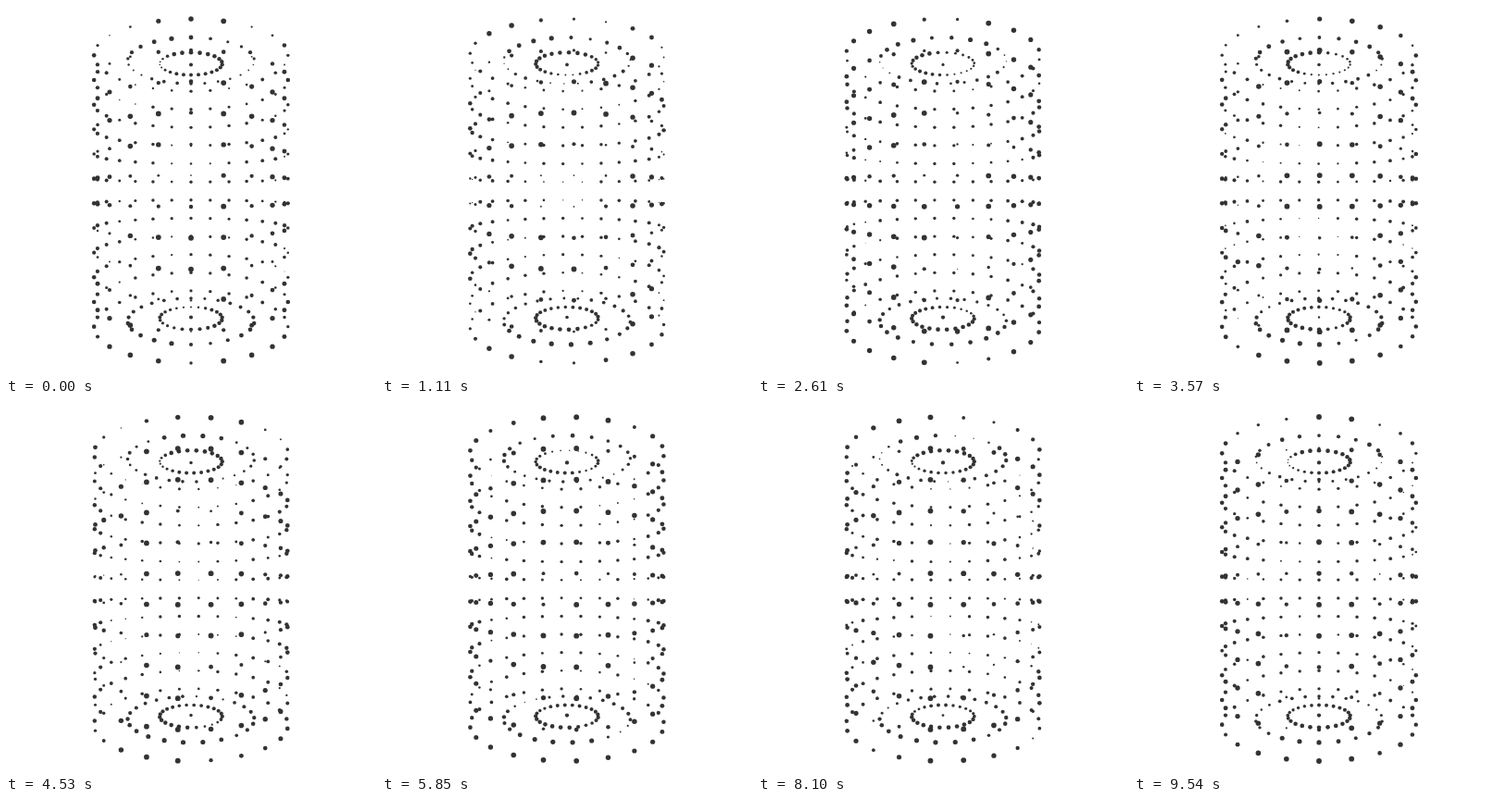
Animation of 400x400 px, one loop 9570 ms. Source, as an HTML page with a canvas:

```html
<!DOCTYPE html>
<html lang="en">
<head>
<meta charset="utf-8">
<title>Dotted cylinder</title>
<style>
  html, body { margin: 0; width: 100%; height: 100%; overflow: hidden; background: #fff; }
  canvas { display: block; width: 400px; height: 400px; }
</style>
</head>
<body>
<canvas id="stage" width="400" height="400"></canvas>
<script>
const ctx = document.getElementById('stage').getContext('2d');
const { sin, cos, min, max, floor, PI } = Math;

const LOOP = 9570, STEP = 30, TURN = 318;
const FOCAL = 380, CAMERA = 3.76, HALF = 1.351;
const SPOKES = 24, ROWS = 12, DOT = 0.0212;

const dots = [];
function addRing(radius, y) {
  for (let i = 0; i < SPOKES; i++) {
    dots.push({ radius, y, angle: i * 2 * PI / SPOKES });
  }
}
for (let row = 0; row < ROWS; row++) {
  addRing(1, HALF * (2 * row / (ROWS - 1) - 1));
}
for (const y of [-HALF, HALF]) {
  addRing(2 / 3, y);
  addRing(1 / 3, y);
  dots.push({ radius: 0, y, angle: 0 });
}

// Smooth drifting field: most dots stay near full size, some patches shrink
function swell(x, y, z, s) {
  const n = sin(5 * x + 1.7 * sin(4 * y + 1.5 * s))
          + sin(5 * z + 1.7 * sin(5 * x - 1.9 * s))
          + sin(6 * y + 1.7 * sin(4 * z + 1.3 * s));
  return min(1, max(0.2, 0.95 + 0.25 * n));
}

function draw(time) {
  const turn = -2 * PI * time / STEP / TURN;
  ctx.fillStyle = '#fff';
  ctx.fillRect(0, 0, 400, 400);
  ctx.fillStyle = '#333';
  for (const { radius, y, angle } of dots) {
    const x = radius * sin(angle + turn);
    const z = radius * cos(angle + turn);
    const scale = FOCAL / (CAMERA - z);
    const size = swell(radius * sin(angle), y, radius * cos(angle), time / 1000);
    ctx.beginPath();
    ctx.arc(200 + x * scale, 200 + y * scale, DOT * scale * size, 0, 2 * PI);
    ctx.fill();
  }
}

const start = performance.now();
function tick() {
  const time = (performance.now() - start) % LOOP;
  draw(floor(time / STEP) * STEP);
  requestAnimationFrame(tick);
}
tick();
</script>
</body>
</html>
```
